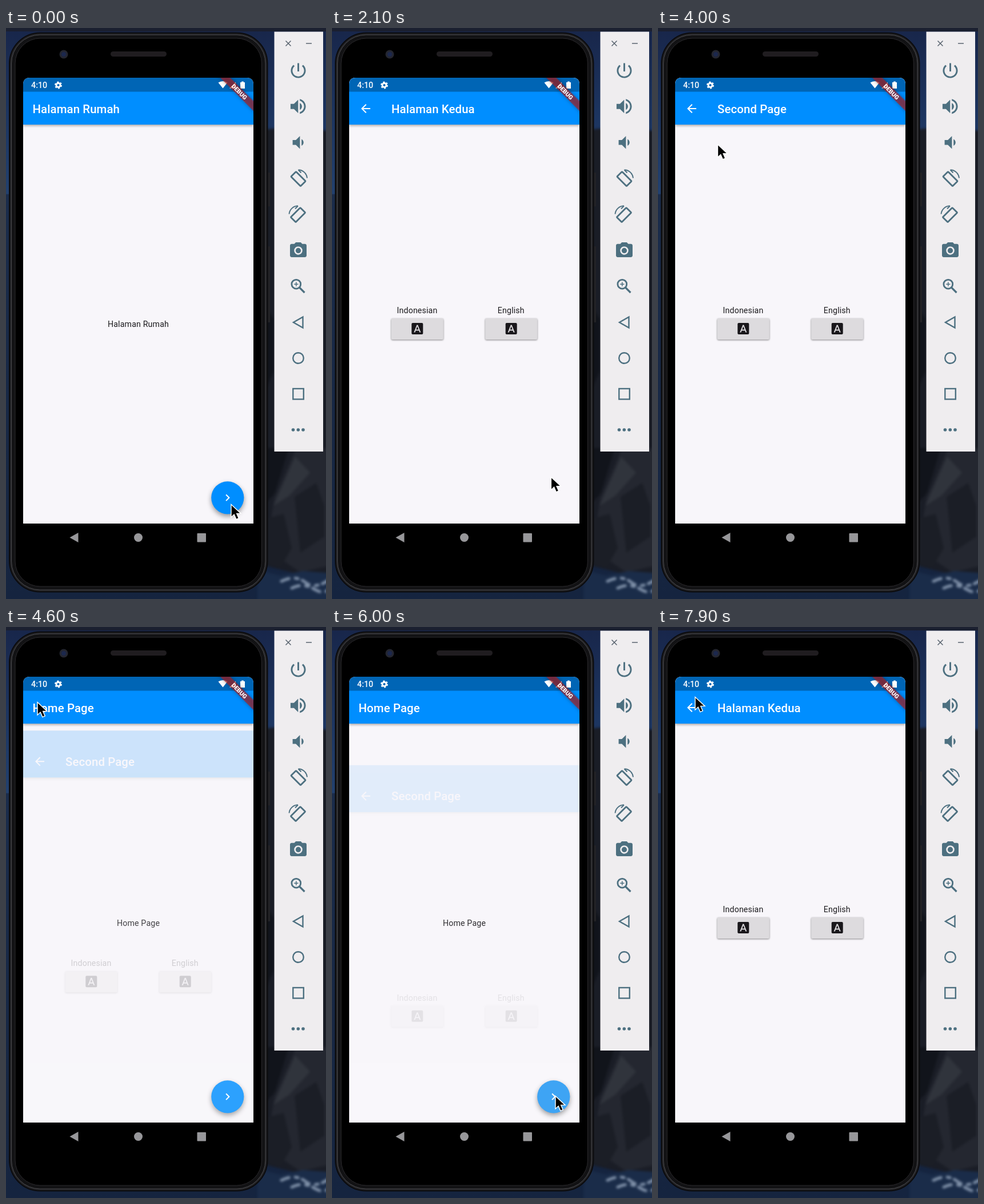
An HTML page that plays this animation: 560 by 999 pixels, repeating every 8 s.

```html
<!DOCTYPE html>
<html lang="id">
<head>
<meta charset="utf-8">
<title>Language switch</title>
<style>
html, body { margin: 0; width: 100%; height: 100%; overflow: hidden; background: #1b2030; }
svg { display: block; width: 100%; height: 100%; }
text { font-family: Roboto, sans-serif; }
.title { font-size: 20.4px; font-weight: 500; letter-spacing: .1px; fill: #fff; }
.body { font-size: 14.2px; letter-spacing: .15px; text-anchor: middle; fill: #1c1b1e; }
.bar { fill: #008eff; filter: drop-shadow(0 2px 2px #0005); }
.tools { fill: #4d7080; }
.line { fill: none; stroke: #4d7080; stroke-width: 2.4; }
.soft { filter: blur(2px); }
</style>
</head>
<body>
<svg viewBox="0 0 560 999">
  <defs>
    <linearGradient id="sky" x2="0" y2="1">
      <stop offset="0" stop-color="#18264a"/>
      <stop offset=".15" stop-color="#1c345f"/>
      <stop offset=".29" stop-color="#22406e"/>
      <stop offset=".292" stop-color="#1a2c4b"/>
      <stop offset="1" stop-color="#15243f"/>
    </linearGradient>
    <clipPath id="screen"><path d="M30 867V99q0-12 12-12H421q12 0 12 12V867z"/></clipPath>
    <g id="choice">
      <rect x="-45.5" y="508" width="91" height="37" rx="2" fill="#dddbde" style="filter:drop-shadow(0 1px 1.5px #0007)"/>
      <path transform="translate(-12 514)" fill="#19171b" d="M9.93 13.5h4.14L12 7.98zM20 2H4c-1.1 0-2 .9-2 2v16c0 1.1.9 2 2 2h16c1.1 0 2-.9 2-2V4c0-1.1-.9-2-2-2zm-4.05 16.5l-1.14-3H9.17l-1.12 3H5.96l5.11-13h1.86l5.11 13h-2.09z"/>
    </g>
    <g id="turn" class="line" stroke-linejoin="round">
      <rect x="-6.2" y="-11.8" width="12.400" height="23.600" rx="1" transform="rotate(-45)" stroke-width="2.800"/>
      <path d="M0-15.700A15.500 15.500 0 0 1 15.500-1.500M0-15.700l5 5" stroke-width="2"/>
    </g>
  </defs>

  <!-- backdrop -->
  <rect width="560" height="999" fill="url(#sky)"/>
  <g class="soft">
    <path fill="#1a1d26" d="M450 178l35-4 85 6V970l-120-30z"/>
    <path fill="#11141b" d="M450 480l19 30v90l-19 40zM450 735h45l-25 80-20 20z"/>
    <path fill="#242730" d="M508 735h62v205l-55 12-60-40 15-90z"/>
    <path fill="#30343c" d="M506 750l26 28-36 40-28 18z"/>
    <path fill="#1b1e26" d="M505 820l38-24 14 40v54l-42 28zM450 860l36-10 14 60-20 35-30-10z"/>
    <path fill="#1a2c49" d="M440 948l40 10 40-8 50 4v55H440z"/>
    <path fill="none" stroke="#7f90a8" stroke-width="5" stroke-linecap="round" stroke-dasharray="14 11 5 8" d="M482 968q24-12 42 2t46-8M500 980q20-10 40 2t28-5"/>
  </g>
  <rect width="560" height="6" fill="#1b2030"/>

  <!-- phone -->
  <path fill="#232326" d="M457 253h5v59h-5zM457 382h5v133h-5z"/>
  <rect x="6" y="8.500" width="451.500" height="978" rx="54" fill="#222225" stroke="#0b0b0d" stroke-width="2"/>
  <rect x="9.500" y="12" width="444.500" height="971" rx="50" fill="#121214" stroke="#4b4b4e"/>
  <rect x="16" y="18" width="431.500" height="959" rx="44" stroke="#2b2a2d"/>
  <rect x="183" y="41" width="98" height="9" rx="4.500" fill="#201d20"/>
  <circle cx="101" cy="46" r="7.500" fill="#242630"/>
  <circle cx="101" cy="46" r="4" fill="#1c284d"/>
  <g fill="#97979a">
    <path d="M111.500 891.500l15-8.500v17z"/>
    <circle cx="231.500" cy="891.500" r="7.500"/>
    <rect x="334.500" y="884" width="15.500" height="15.500" rx="1"/>
  </g>

  <!-- app -->
  <g clip-path="url(#screen)">
    <rect x="30" y="87" width="403" height="780" fill="#f8f6fa"/>
    <rect class="bar" x="30" y="87" width="403" height="82"/>
    <text class="title" id="homeTitle" x="46.500" y="148.500"></text>
    <text class="body" id="homeBody" x="231.500" y="523"></text>
    <circle cx="387.800" cy="821.800" r="28.600" fill="#008eff" style="filter:drop-shadow(0 4px 4px #0006)"/>
    <circle id="splash" cx="387.800" cy="821.800" r="28.600" fill="#c8c8c8"/>
    <path fill="#fff" transform="translate(375.800 809.800)" d="M10 6L8.590 7.410 13.170 12l-4.580 4.590L10 18l6-6z"/>

    <g id="second">
      <rect x="30" y="87" width="403" height="780" fill="#f8f6fa"/>
      <rect class="bar" x="30" y="87" width="403" height="82"/>
      <path fill="#fff" transform="translate(47 129)" d="M20 11H7.830l5.590-5.590L12 4l-8 8 8 8 1.410-1.410L7.830 13H20z"/>
      <text class="title" id="secondTitle" x="104" y="148.500"></text>
      <text class="body" x="149" y="499">Indonesian</text>
      <text class="body" x="313.300" y="499">English</text>
      <use href="#choice" x="149.300"/>
      <use href="#choice" x="313.700"/>
    </g>

    <!-- status bar -->
    <rect x="30" y="87" width="403" height="24.500" fill="#000" fill-opacity=".29"/>
    <g fill="#fff">
      <text x="44" y="105" font-size="14.300" font-weight="500">4:10</text>
      <path d="M371.500 95.500q8-5 16 0l-8 10zM391 105.500l11-11v11zM410 95h2.200v-1.500h3.600V95h2.200v11h-8z"/>
    </g>
    <g fill="none" stroke="#fff">
      <circle cx="91.500" cy="100" r="3.500" stroke-width="2.800"/>
      <circle cx="91.500" cy="100" r="5.500" stroke-width="2" stroke-dasharray="3 2.760"/>
    </g>
    <g transform="translate(433 87) rotate(45)">
      <rect x="-60" y="28.700" width="120" height="12.300" fill="#b71c1c" fill-opacity=".63" style="filter:drop-shadow(0 0 3px #0008)"/>
      <text y="38.600" font-size="10.500" font-weight="900" fill="#fff" text-anchor="middle">DEBUG</text>
    </g>
  </g>

  <!-- emulator controls -->
  <rect x="469.500" y="6.500" width="85.500" height="734.500" fill="#efedef"/>
  <path fill="none" stroke="#5a6570" stroke-width="1.500" d="M489.500 22.500l9 9m0-9l-9 9M525 27h10"/>
  <g class="tools">
    <path transform="translate(494.100 57.100) scale(1.450)" d="M13 3h-2v10h2zm4.830 2.170l-1.420 1.420C17.990 7.860 19 9.810 19 12c0 3.870-3.130 7-7 7s-7-3.130-7-7c0-2.190 1.010-4.140 2.580-5.420L6.170 5.170C4.230 6.820 3 9.260 3 12c0 4.970 4.030 9 9 9s9-4.030 9-9c0-2.740-1.230-5.180-3.170-6.830z"/>
    <path transform="translate(493.500 119.500) scale(1.480)" d="M3 9v6h4l5 5V4L7 9zm13.500 3c0-1.770-1.020-3.290-2.500-4.030v8.050c1.480-.73 2.500-2.250 2.500-4.020zM14 3.230v2.060c2.890.86 5 3.540 5 6.710s-2.110 5.850-5 6.710v2.060c4.010-.91 7-4.490 7-8.770s-2.990-7.860-7-8.770z"/>
    <path transform="translate(494.500 183.200) scale(1.420)" d="M18.500 12c0-1.770-1.020-3.290-2.500-4.030v8.050c1.480-.73 2.500-2.250 2.500-4.020zM5 9v6h4l5 5V4L9 9z"/>
    <path fill-rule="evenodd" transform="translate(494.100 372) scale(1.450)" d="M9 2L7.170 4H4c-1.100 0-2 .9-2 2v12c0 1.100.9 2 2 2h16c1.100 0 2-.9 2-2V6c0-1.100-.9-2-2-2h-3.170L15 2zm3 15a5 5 0 1 1 0-10 5 5 0 0 1 0 10z"/>
    <circle cx="511.500" cy="389.400" r="4.600"/>
    <circle cx="502.500" cy="703" r="2.800"/>
    <circle cx="511.300" cy="703" r="2.800"/>
    <circle cx="520" cy="703" r="2.800"/>
  </g>
  <use href="#turn" x="511.500" y="264"/>
  <use href="#turn" transform="translate(511 327) scale(-1 1)"/>
  <g class="line">
    <circle cx="507.800" cy="448.200" r="7.900" stroke-width="2.800"/>
    <path d="M504.200 448.200h7.200m-3.600-3.600v7.200" stroke-width="1.500"/>
    <path d="M513.500 454l9 9" stroke-width="3.200"/>
    <path d="M503 515l16.500-9.500v19z"/>
    <circle cx="511.500" cy="577.500" r="9.300"/>
    <rect x="502.300" y="631" width="18.500" height="18.500"/>
  </g>

  <path id="cursor" d="M1 1.500V24l5.200-4.900 3.700 8.500 4.400-1.900-3.600-8.300h7.300z" stroke="#fff" stroke-width="1.400"/>
</svg>
<script>
const LOOP = 8000, FRAME = 100, ROUTE = 300;
const $ = id => document.getElementById(id);
const clamp = v => Math.max(0, Math.min(1, v));

function bezier(x1, y1, x2, y2) {
  const at = (a, b, u) => 3 * a * u * (1 - u) ** 2 + 3 * b * u * u * (1 - u) + u ** 3;
  return x => {
    let lo = 0, hi = 1;
    for (let i = 0; i < 24; i++) {
      const mid = (lo + hi) / 2;
      if (at(x1, x2, mid) < x) lo = mid; else hi = mid;
    }
    return at(y1, y2, hi);
  };
}
const slide = bezier(.4, 0, .2, 1), fade = bezier(.42, 0, 1, 1);

// pointer tip: time, x, y
const path = [
  [0, 393, 832], [1900, 393, 832], [2700, 325, 526], [3200, 325, 526],
  [4300, 54, 130], [4700, 54, 130], [5700, 390, 819], [6100, 390, 819],
  [6600, 160, 532], [7100, 160, 532], [7700, 64, 121], [LOOP, 64, 121]
];
function pointer(t) {
  const i = path.findIndex(p => p[0] > t);
  const [t0, x0, y0] = path[i - 1], [t1, x1, y1] = path[i];
  const u = (t - t0) / (t1 - t0), s = u * u * (3 - 2 * u);
  return [x0 + (x1 - x0) * s, y0 + (y1 - y0) * s];
}

// how far the second page has been pushed, 0 to 1
function pushed(t) {
  if (t < 4300) return clamp((t - 1550) / ROUTE);
  if (t < 5500) return clamp(1 - (t - 4407) / ROUTE);
  return clamp((t - 5929) / ROUTE);
}

function draw(t) {
  const english = t >= 2800 && t < 6900;
  const home = english ? 'Home Page' : 'Halaman Rumah';
  $('homeTitle').textContent = $('homeBody').textContent = home;
  $('secondTitle').textContent = english ? 'Second Page' : 'Halaman Kedua';

  const p = pushed(t);
  $('second').setAttribute('transform', `translate(0 ${195 * (1 - slide(p))})`);
  $('second').setAttribute('opacity', fade(p));
  $('second').setAttribute('visibility', p ? 'visible' : 'hidden');

  const pressed = (t >= 1500 && t < 1900) || (t >= 5900 && t < 6300);
  $('splash').setAttribute('opacity', pressed ? .22 : 0);
  $('cursor').setAttribute('transform', `translate(${pointer(t)})`);
}

const start = performance.now();
function tick() {
  const t = (performance.now() - start + 15) % LOOP;
  draw(Math.floor(t / FRAME) * FRAME);
  requestAnimationFrame(tick);
}
tick();
</script>
</body>
</html>
```
